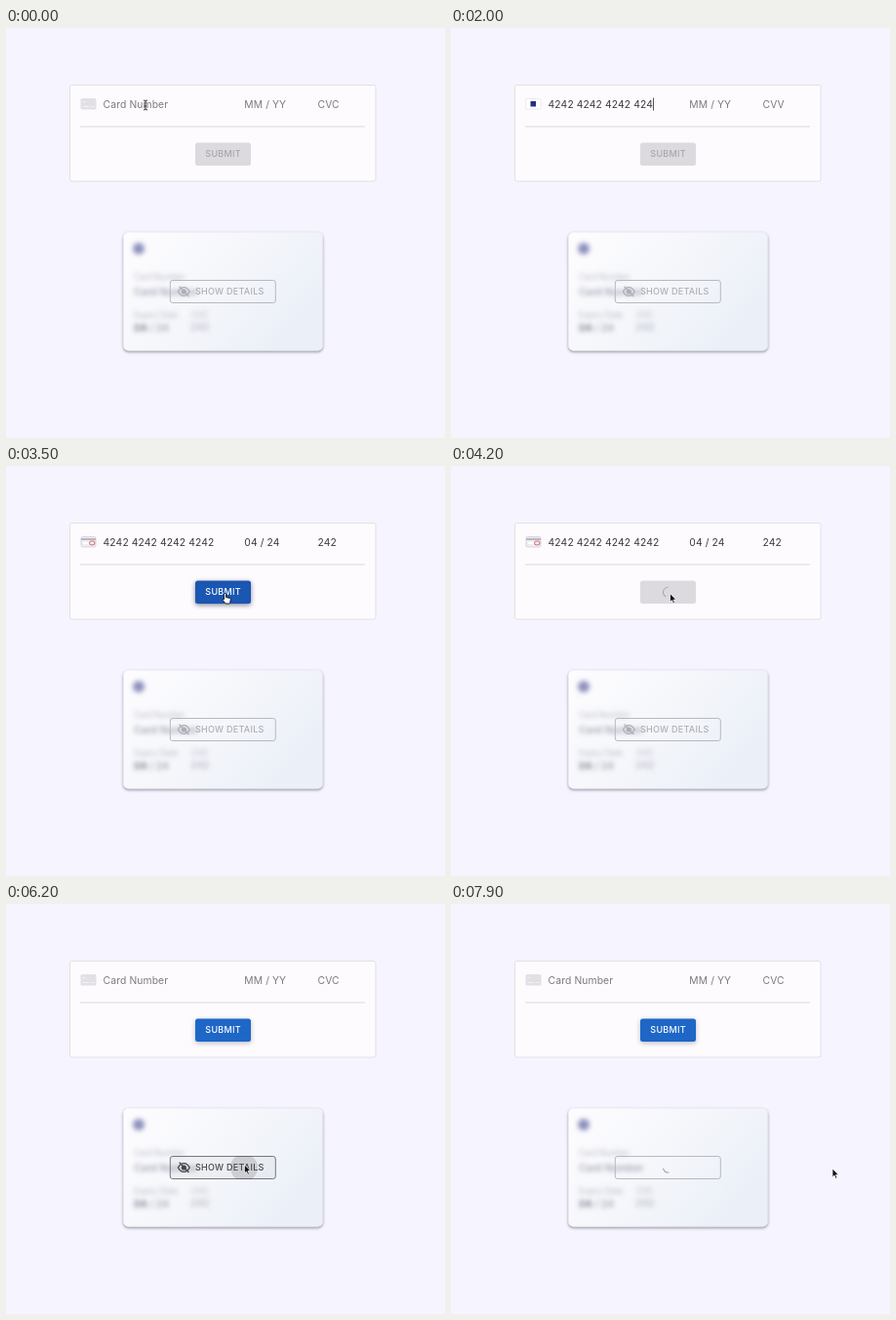
An HTML page that plays this animation: 450 by 420 pixels, repeating every 8000 ms.

```html
<!DOCTYPE html>
<html lang="en">
<head>
<meta charset="utf-8">
<title>Card form</title>
<style>
  html, body { margin: 0; width: 100%; height: 100%; overflow: hidden; background: #f6f4fe; }
  svg { display: block; width: 450px; height: 420px; font-family: Inter, "Open Sans", sans-serif; }
  text { white-space: pre; }
  .field { font-size: 10.3px; letter-spacing: .12px; }
  .label { font-size: 9px; font-weight: 500; letter-spacing: .26px; }
</style>
</head>
<body>
<svg viewBox="0 0 450 420">
  <defs>
    <linearGradient id="sheen" x1="0" y1="0" x2="1" y2=".5">
      <stop offset="0" stop-color="#fdfdff"/>
      <stop offset=".5" stop-color="#f6f7fb"/>
      <stop offset="1" stop-color="#ebf0f8"/>
    </linearGradient>
    <filter id="soft" x="-30%" y="-30%" width="160%" height="160%"><feGaussianBlur stdDeviation="2.8"/></filter>
    <filter id="lift" x="-10%" y="-10%" width="120%" height="125%">
      <feDropShadow dx="0" dy="1.2" stdDeviation="1.6" flood-color="#15151f" flood-opacity=".5"/>
    </filter>
    <clipPath id="submitClip"><rect x="194" y="117.5" width="57" height="23.5" rx="2.5"/></clipPath>
    <clipPath id="showClip"><rect x="168" y="258" width="109" height="24" rx="2.5"/></clipPath>
  </defs>

  <rect width="450" height="420" fill="#f6f4fe"/>

  <rect x="65.5" y="58.5" width="313.5" height="98.5" rx="2" fill="#fdfbfe" stroke="#e3e0e6"/>
  <rect x="76" y="100.5" width="292" height="1" fill="#dbd9df"/>

  <g id="iconBlank">
    <rect x="76.5" y="72" width="16" height="11.5" rx="1.5" fill="#e2e0e4"/>
    <path d="M78.5 75.5h3M78.5 80.5h7M87 80.5h3.5" stroke="#f3f1f5"/>
  </g>
  <g id="iconBrand">
    <rect x="76.5" y="72.5" width="15.5" height="10.5" rx="1.5" fill="#fff" stroke="#e6e5ee" stroke-width=".8"/>
    <rect x="81.5" y="75" width="5.5" height="5.5" fill="#27307f"/>
  </g>
  <g id="iconCode">
    <rect x="77" y="72.5" width="15" height="10.5" rx="1.5" fill="#efedf1" stroke="#cfcdd3" stroke-width=".8"/>
    <rect x="77" y="74" width="15" height="2" fill="#b9b7be"/>
    <rect x="79" y="78" width="7" height="2" fill="#fff"/>
    <rect id="codeRing" x="85.5" y="77" width="5.5" height="3.8" rx="1.9" fill="none"/>
  </g>

  <text id="number" class="field" x="99.6" y="81.6"/>
  <text id="expiry" class="field" x="244.3" y="81.6"/>
  <text id="code" class="field" x="319.6" y="81.6"/>
  <rect id="caret" y="71.5" width="1" height="13" fill="#55535a"/>

  <g>
    <rect id="submitShade" x="194" y="119" width="57" height="23.5" rx="2.5" fill="#202840" filter="url(#soft)"/>
    <rect id="submit" x="194" y="117.5" width="57" height="23.5" rx="2.5"/>
    <g clip-path="url(#submitClip)"><circle id="submitRipple" cx="225" cy="131" fill="#fff"/></g>
    <text id="submitText" class="label" x="222.6" y="132.4" text-anchor="middle">SUBMIT</text>
  </g>

  <rect x="120.5" y="209.5" width="204" height="121" rx="5" fill="url(#sheen)" filter="url(#lift)"/>
  <g filter="url(#soft)" fill="#85859a">
    <circle cx="136" cy="226" r="6" fill="#8d90bd"/>
    <g font-size="8.3" opacity=".6">
      <text x="131" y="258">Card Number</text>
      <text x="131" y="297">Expiry Date</text>
      <text x="190" y="297">CVC</text>
    </g>
    <g font-size="10.3" font-weight="600" opacity=".75">
      <text x="131" y="274">Card Number</text>
      <text x="131" y="311"><tspan fill="#45455a">04</tspan> / 24</text>
      <text x="189" y="310" opacity=".7">242</text>
    </g>
  </g>

  <rect id="show" x="168.3" y="258.5" width="108" height="23" rx="2.5" fill="#000" fill-opacity="0"/>
  <g clip-path="url(#showClip)"><circle id="showRipple" cx="244" cy="270" fill="#000"/></g>
  <g id="showLabel">
    <g fill="none" stroke="currentColor" stroke-width="1.3">
      <path d="M176.4 270q2.2-4.4 5.9-4.4t5.9 4.4q-2.2 4.4-5.9 4.4t-5.9-4.4Z"/>
      <circle cx="182.3" cy="270" r="1.9" fill="currentColor"/>
      <path d="M177.6 264.6l9.8 10.4"/>
    </g>
    <text class="label" x="194" y="273.3" fill="currentColor">SHOW DETAILS</text>
  </g>

  <circle id="spinner" r="5" fill="none" stroke="#a5a3aa" stroke-width="1"/>

  <path id="beam" fill="none" stroke="#333" d="M-2-5q2 0 2 1.5v7q0 1.5-2 1.5M2-5q-2 0-2 1.5m0 7q0 1.5 2 1.5M-1.3 1h2.6"/>
  <path id="arrow" fill="#111" stroke="#fff" stroke-width=".7" d="M0 0V8.8L2 7 3.4 10.2 4.9 9.5 3.5 6.5H6.2Z"/>
  <path id="hand" fill="#fff" stroke="#111" stroke-width=".9" d="M-1 6V1a1 1 0 0 1 2 0V4L5 4.9q.9.3.8 1.3L5.2 9.6q-.2.9-1.1.9H1.3Q.5 10.5 0 9.7L-2.6 6.6Q-2.7 5.2-1 6Z"/>
</svg>
<script>
const LOOP = 8000, STEP = 100;
const LOADING = 3900, RESET = 4600, DETAILS = 6300;
const el = Object.fromEntries([...document.querySelectorAll('[id]')].map(e => [e.id, e]));

const set = (e, attrs) => { for (const k in attrs) e.setAttribute(k, attrs[k]); };
const show = (e, on) => set(e, { visibility: on ? 'visible' : 'hidden' });
const clamp = v => Math.max(0, Math.min(1, v));
const ease = v => { v = clamp(v); return v * v * (3 - 2 * v); };
const span = (t, a, b) => clamp((t - a) / (b - a));
const mix = (a, b, k) => `rgb(${a.map((v, i) => Math.round(v + (b[i] - v) * k))})`;

// [time, x, y]; the pointer exists only within a track
const tracks = [
  [[0, 143, 79], [300, 143, 79]],
  [[2900, 143, 79], [3400, 224.5, 130.5], [4500, 224.5, 130.5]],
  [[5300, 421, 123], [5900, 244.5, 267], [6500, 244.5, 267], [7000, 391.5, 271], [LOOP, 391, 271]]
];

function pointerAt(t) {
  const track = tracks.find(p => t >= p[0][0] && t <= p[p.length - 1][0]);
  if (!track) return null;
  const i = Math.max(1, track.findIndex(p => p[0] >= t));
  const [a, b] = [track[i - 1], track[i]];
  const k = ease(span(t, a[0], b[0]));
  return { x: a[1] + (b[1] - a[1]) * k, y: a[2] + (b[2] - a[2]) * k };
}

const inside = (p, x, y, w, h) => !!p && p.x >= x && p.x <= x + w && p.y >= y && p.y <= y + h;

function typedCount(t) {
  if (t < 600 || t >= RESET) return 0;
  if (t < 800) return 1;
  if (t <= 1100) return Math.floor((t - 600) / 100);
  return Math.min(23, Math.floor(5 + (t - 1100) * 18 / 1600));
}

function drawField(e, value, hint) {
  e.textContent = value || hint;
  set(e, { fill: value ? '#3b393f' : '#7c7a81' });
  return +e.getAttribute('x') + (value ? e.getComputedTextLength() : 0);
}

function drawForm(t) {
  const n = typedCount(t);
  const number = '4242'.repeat(4).slice(0, n).replace(/(.{4})(?=.)/g, '$1 ');
  const date = '0424'.slice(0, Math.max(0, n - 16));
  const expiry = date.length < 2 ? date : date.slice(0, 2) + ' / ' + date.slice(2);
  const ends = [
    drawField(el.number, number, 'Card Number'),
    drawField(el.expiry, expiry, 'MM / YY'),
    drawField(el.code, '242'.slice(0, Math.max(0, n - 20)), n > 1 ? 'CVV' : 'CVC')
  ];
  set(el.caret, { x: ends[n < 16 ? 0 : n < 20 ? 1 : 2] });
  show(el.caret, t >= 300 && t < 3200);
  show(el.iconBlank, n < 2);
  show(el.iconBrand, n >= 2 && n < 20);
  show(el.iconCode, n >= 20);
  set(el.codeRing, { stroke: t < 2900 ? '#77757c' : '#e0616b' });
}

function drawSubmit(t, hover) {
  const busy = t >= LOADING && t < RESET;
  let on = 0;
  if (t < LOADING) on = [0, .15, .7, 1][Math.max(0, Math.min(3, (t - 2600) / 100))];
  else if (t >= RESET) on = [0, .5, 1][Math.max(0, Math.min(2, (t - 4700) / 100))];
  const blue = hover ? [26, 86, 178] : [30, 103, 199];
  set(el.submit, { fill: mix([220, 218, 223], blue, on) });
  set(el.submitText, { fill: mix([168, 166, 172], [255, 255, 255], Math.min(1, on * 5)) });
  set(el.submitShade, { opacity: on * (hover ? .55 : .3) });
  const k = span(t, 3500, 3800);
  set(el.submitRipple, { r: k * 40, opacity: t < LOADING ? .25 * (1 - k) : 0 });
  show(el.submitText, !busy);
}

function drawDetails(t, hover) {
  const active = t >= RESET, busy = t >= DETAILS;
  el.showLabel.style.color = active ? '#47454c' : '#b0aeb5';
  show(el.showLabel, !busy);
  set(el.show, {
    stroke: active && hover && !busy ? '#77757d' : '#b9b7bf',
    'fill-opacity': active && hover && !busy ? .03 : 0
  });
  const k = span(t, 6000, 6400);
  set(el.showRipple, { r: k * 28, opacity: k < 1 ? .13 * Math.min(1, 2 - 2 * k) : 0 });
}

function drawSpinner(t) {
  const onSubmit = t >= LOADING && t < RESET;
  show(el.spinner, onSubmit || t >= DETAILS);
  const phase = ((t - (onSubmit ? 3840 : 6241) + 1400 * 9) % 1400) / 1400;
  const grow = ease(phase * 2), slide = ease(phase * 2 - 1);
  const unit = 2 * Math.PI * 5 / 126;
  set(el.spinner, {
    'stroke-dasharray': `${(1 + 99 * grow) * unit} ${200 * unit}`,
    'stroke-dashoffset': -(15 * grow + 110 * slide) * unit,
    transform: `translate(222.5 ${onSubmit ? 129.3 : 270}) rotate(${phase * 360})`
  });
}

function drawPointer(t, p, overSubmit, overShow) {
  const inField = inside(p, 76, 68, 292, 24);
  const hand = overSubmit && t < LOADING;
  const shape = !p ? null : inField ? el.beam : hand ? el.hand : el.arrow;
  for (const e of [el.beam, el.hand, el.arrow]) show(e, e === shape);
  if (shape) set(shape, { transform: `translate(${p.x} ${p.y})` });
}

function render(t) {
  const p = pointerAt(t);
  const overSubmit = inside(p, 194, 117, 57, 24);
  const overShow = inside(p, 168, 258, 109, 24);
  drawForm(t);
  drawSubmit(t, overSubmit);
  drawDetails(t, overShow);
  drawSpinner(t);
  drawPointer(t, p, overSubmit, overShow);
}

const start = performance.now();
function tick() {
  const t = (performance.now() - start) % LOOP;
  render(Math.floor(t / STEP) * STEP);
  requestAnimationFrame(tick);
}
tick();
</script>
</body>
</html>
```
